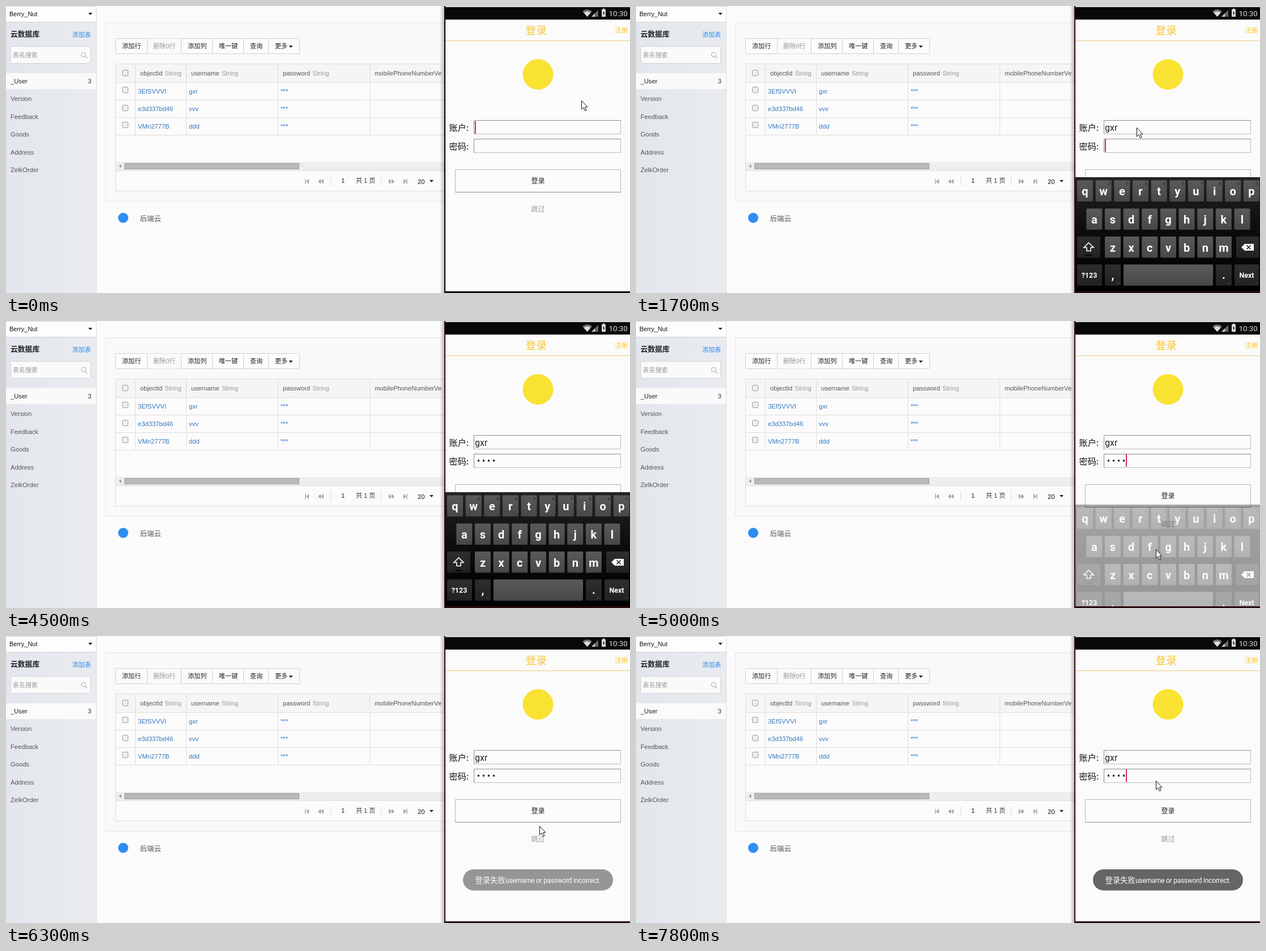
These frames come from a looping animation (1102 px wide and 508 px high, 8000 ms). An HTML page:

```html
<!DOCTYPE html>
<html lang="zh-CN">
<head>
<meta charset="utf-8">
<style>
html, body { margin: 0; width: 100%; height: 100%; overflow: hidden; background: #fbfbfb; }
svg { display: block; width: 100vw; height: 100vh; }
text { font-family: "Liberation Sans", "Noto Sans CJK SC", "Noto Sans CJK", sans-serif; white-space: pre; }
.phone { font-family: Roboto, "Noto Sans CJK SC", "Noto Sans CJK", sans-serif; }
.mono { font-family: "Noto Sans Mono", monospace; }
</style>
</head>
<body>
<svg id="stage" viewBox="0 0 1102 508">
  <defs>
    <linearGradient id="side" x2="1" y2="0"><stop stop-color="#e3e7ed"/><stop offset="1" stop-color="#e9ebef"/></linearGradient>
    <linearGradient id="shade" x2="1" y2="0"><stop stop-color="#000" stop-opacity="0"/><stop offset="1" stop-color="#000" stop-opacity=".25"/></linearGradient>
    <linearGradient id="board" x2="0" y2="1"><stop stop-color="#242424"/><stop offset=".45" stop-color="#0c0c0c"/><stop offset="1" stop-color="#000"/></linearGradient>
    <linearGradient id="key" x2="0" y2="1"><stop stop-color="#5a5a5a"/><stop offset="1" stop-color="#474747"/></linearGradient>
    <linearGradient id="fnKey" x2="0" y2="1"><stop stop-color="#2e2e2e"/><stop offset="1" stop-color="#222"/></linearGradient>
    <clipPath id="cell"><rect x="642" y="103" width="127" height="32"/></clipPath>
    <clipPath id="screen"><rect x="776" y="24" width="326" height="481"/></clipPath>
  </defs>
</svg>
<script>
const LOOP = 8000, STEP = 100;
const USER = 'gxr', PASS = '1234';
const USER_TIMES = [800, 1000, 1300], PASS_TIMES = [2400, 2500, 2800, 3000];
const CARET_RESETS = [0, 800, 1000, 1300, 1700, 2400, 2800];
const FOCUS_PASS = 1700, MASK_LAST = 4400;
// Pointer path: time, x, y
const POINTER = [
  [0, 1016, 167], [600, 884, 215], [2900, 884, 215], [3300, 963, 286], [3400, 963, 286],
  [3700, 1055, 345], [4000, 1018, 420], [4300, 893, 484], [4400, 884, 498], [4500, 876, 512],
  [4600, 878, 512], [4700, 884, 492], [5000, 918, 404], [5500, 946, 313], [5600, 946, 314],
  [6000, 946, 314], [6300, 942, 336], [6900, 1038, 436], [7800, 918, 256], [8000, 918, 256]
];

const stage = document.getElementById('stage');
const clamp = v => Math.max(0, Math.min(1, v));

function add(tag, attrs, parent = stage) {
  const node = document.createElementNS('http://www.w3.org/2000/svg', tag);
  for (const k in attrs) node.setAttribute(k, attrs[k]);
  return parent.appendChild(node);
}
const rect = (x, y, width, height, fill, more, parent) =>
  add('rect', { x, y, width, height, fill, ...more }, parent);
const frame = (x, y, w, h, stroke, fill = 'none', rx = 0) =>
  rect(x + .5, y + .5, w, h, fill, { stroke, rx });
const path = (d, fill, more, parent) => add('path', { d, fill, ...more }, parent);
const line = (d, stroke, more, parent) => path(d, 'none', { stroke, ...more }, parent);
function text(str, x, y, size, fill, more, parent) {
  const node = add('text', { x, y, 'font-size': size, fill, ...more }, parent);
  node.textContent = str;
  return node;
}

function drawSidebar() {
  rect(0, 28, 160, 480, 'url(#side)');
  line('M159.5 0V508', '#d9dce1');
  rect(0, 0, 159, 28, '#fdfdfd');
  line('M0 28.5H160M0 .5H159', '#d0d3d8');
  text('Berry_Nut', 6, 18, 11, '#111');
  path('M145.500 12h7l-3.500 4z', '#111');
  text('云数据库', 8, 54, 12.8, '#222', { 'font-weight': 700 });
  text('添加表', 117, 54.5, 11, '#2b8cf0');
  frame(8, 71, 141, 30, '#cfd3d8', '#fafafa', 1);
  text('表名搜索', 12, 91, 11, '#999');
  add('circle', { cx: 137, cy: 86, r: 3.8, fill: 'none', stroke: '#bbb', 'stroke-width': 1.3 });
  line('M139.800 89l3.500 3.500', '#bbb', { 'stroke-width': 1.6 });
  rect(0, 119, 159, 28, '#fafafa');
  ['_User', 'Version', 'Feedback', 'Goods', 'Address', 'ZelkOrder'].forEach((name, i) =>
    text(name, 8, 137 + i * 31.4, 11.2, i ? '#555' : '#222'));
  text('3', 144.5, 137, 11.2, '#333');
}

function drawTable() {
  frame(175, 29, 620, 316, '#e6e6e6', '#f9f9f9');
  frame(193, 57, 325, 27, '#cfcfcf', '#fcfcfc', 2);
  frame(249, 57, 60, 27, '#e0e0e0', '#fafafa');
  line('M249.500 57V85M309.500 57V85M364.500 57V85M419.500 57V85M463.500 57V85', '#cfcfcf');
  [['添加行', 205], ['删除0行', 260], ['添加列', 321], ['唯一键', 376], ['查询', 431], ['更多', 475]]
    .forEach(([s, x], i) => text(s, x, 74.5, 11.1, i === 1 ? '#999' : '#222'));
  path('M499.500 70h7l-3.500 4z', '#222');

  frame(193, 102, 600, 225, '#dedede', '#fbfbfb');
  rect(194, 103, 590, 32, '#f5f5f5');
  line('M194 135.500H775M194 166.500H775M194 197.500H775M194 228.500H775M228.500 103V228M318.500 103V228M480.500 103V228M642.500 103V228', '#dedede');
  [['objectId', 237], ['username', 327], ['password', 489]].forEach(([s, x]) => {
    const w = text(s, x, 123, 11.2, '#555').getComputedTextLength();
    text('String', x + w + 4.3, 123, 11.2, '#999');
  });
  text('mobilePhoneNumberVerified', 651, 123, 11.2, '#555', { 'clip-path': 'url(#cell)' });
  [['3EfSVVVI', USER], ['e3d337bd46', 'vvv'], ['VMn2777B', 'ddd']].forEach(([id, user], i) => {
    const y = 154.5 + i * 31.2;
    [[id, 233], [user, 323], ['***', 485]].forEach(([s, x]) => text(s, x, y, 11.2, '#3577bd'));
  });
  [113, 143, 175, 205].forEach(y => frame(205, y, 10, 10, '#999', '#eee', 2));

  rect(194, 276, 582, 15, '#eeeeee');
  path('M203.500 280v7l-4-3.500z', '#999');
  frame(209, 278, 308, 10, '#a2a2a2', '#b9b9b9');
  line('M194 291.500H775', '#dedede');
  const grey = '#aaa';
  rect(528, 306, 1.5, 9, grey);
  path('M535 306v9l-5-4.500zM556 306v9l-5-4.500zM561 306v9l-5-4.500zM676 306v9l5-4.500zM681 306v9l5-4.500zM702 306v9l5-4.500z', grey);
  rect(707, 306, 1.5, 9, grey);
  line('M573.500 301V318M662.500 301V318', '#ddd');
  text('1', 592, 313, 11.2, '#222');
  text('共 1 页', 618, 313, 11, '#333');
  text('20', 727, 314.5, 11.2, '#111');
  path('M748 308h7l-3.500 4z', '#222');

  add('circle', { cx: 207, cy: 375, r: 9, fill: '#2f8df2' });
  text('后端云', 236.5, 380.5, 12.5, '#555');
}

function drawPhone() {
  rect(766, 0, 8, 508, 'url(#shade)');
  const edge = rect(774, 0, 328, 508, '#000');
  rect(776, 0, 326, 2, '#d8d8d8');
  rect(776, 2, 326, 22, '#080808');
  rect(776, 24, 326, 481, '#fbfbfb');
  path('M1018 9.500Q1026.500 3 1035 9.500L1026.500 19z', '#777');
  path('M1020.500 12Q1026.500 7.500 1032.500 12L1026.500 19z', '#ddd');
  path('M1046 7v12h-12z', '#666');
  path('M1040 13v6h-6z', '#ccc');
  path('M1052 6h2v-1.500h3V6h2v13h-7z', '#ddd');
  path('M1056.500 8l-3 5h2l-1 4 3.300-5h-2z', '#222');
  const ph = { class: 'phone' };
  text('10:30', 1064.5, 17.5, 13.4, '#ddd', ph);
  text('登录', 917.5, 50, 18.7, '#fcc62c', ph);
  text('注册', 1075, 47, 11.7, '#fcc62c', ph);
  line('M776 61.500H1102', '#e6cc78');
  add('circle', { cx: 939.5, cy: 121, r: 27, fill: '#fae232' });
  [['账户:', 221, 202], ['密码:', 253.5, 235]].forEach(([s, y, top]) => {
    text(s, 782.5, y, 15.2, '#111', { class: 'phone', 'font-weight': 500 });
    frame(826, top, 259, 24, '#bdbdbd', '#fcfcfc');
    line(`M826.500 ${top + 25}V${top + .5}H1086`, '#8c8c8c');
  });
  frame(793, 289, 292, 40, '#b5b5b5', '#fcfcfc');
  line('M793 329.500H1086', '#8c8c8c');
  text('登录', 927.5, 314, 12, '#222', ph);
  text('跳过', 927.5, 364, 12, '#999', ph);
  return edge;
}

function drawKeyboard() {
  const clip = add('g', { 'clip-path': 'url(#screen)' });
  const board = add('g', {}, clip);
  const strip = add('g', {}, board);
  rect(776, 269.500, 326, 34, '#222', {}, strip);
  line('M880.500 277V298M998.500 277V298', '#333', {}, strip);
  rect(776, 303, 326, 210, 'url(#board)', {}, board);

  const mid = { class: 'phone', 'text-anchor': 'middle', 'font-weight': 700 };
  const key = (x, y, w, fill) => rect(x, y - 18.5, w, 37.5, `url(#${fill})`, { rx: 1.5 }, board);
  const label = (s, x, y, size = 20, parent = board) => text(s, x, y, size, '#fff', mid, parent);
  [['qwertyuiop', 779, 327], ['asdfghjkl', 795.300, 377], ['zxcvbnm', 828, 426.500]].forEach(([row, x0, y], r) =>
    [...row].forEach((ch, i) => {
      const x = x0 + i * 32.65;
      key(x, y, 28, 'key');
      label(ch, x + 14, y + 8);
      if (!r) text((i + 1) % 10, x + 21.5, y - 10, 8, '#222', { class: 'phone' }, board);
    }));
  key(779, 426.5, 41, 'fnKey');
  key(1060, 426.5, 40, 'fnKey');
  key(779, 476, 44, 'fnKey');
  key(828, 476, 28, 'fnKey');
  key(861, 476, 158, 'key');
  key(1024, 476, 28, 'fnKey');
  key(1057, 476, 43, 'fnKey');
  line('M799.500 419l8.500 8.500h-5v6h-7v-6h-5z', '#fff', { 'stroke-width': 1.6 }, board);
  line('M793 441.500H806', '#000', { 'stroke-width': 2 }, board);
  path('M1069 427l6-6h16v12h-16z', '#fff', {}, board);
  line('M1078.500 423.500l7 7m0-7l-7 7', '#222', { 'stroke-width': 1.7 }, board);
  label('?123', 800.5, 481, 12.5);
  label(',', 842, 483);
  label('.', 1038, 483);
  [848, 1044, 1093].forEach(x => text('...', x, 491, 8, '#bbb', { class: 'phone' }, board));
  const next = label('Next', 1078.5, 481, 12.5);
  const enter = add('g', {}, board);
  line('M1091.500 469V476H1070', '#fff', { 'stroke-width': 2 }, enter);
  path('M1064 476l8-5.500v11z', '#fff', {}, enter);
  return { board, strip, next, enter };
}

function drawToast() {
  const g = add('g', {});
  rect(807, 413, 265, 37.5, '#656565', { rx: 18.7 }, g);
  text('登录失败', 828.5, 437, 13.3, '#fff', { class: 'phone' }, g);
  text('username or password incorrect.', 882, 437, 12, '#fff', { class: 'phone', 'letter-spacing': -.25 }, g);
  return g;
}

drawSidebar();
drawTable();
const edge = drawPhone();
const userText = text('', 828, 221, 16, '#222', { class: 'phone' });
const passText = text('', 830, 253, 15, '#222', { class: 'mono' });
const caret = rect(0, 0, 2, 22, '#d8246a');
const kb = drawKeyboard();
const toast = drawToast();
const pointer = path('M.500 .500V16L4 12.700 6.500 18.500 9 17.400 6.600 11.800H11z', '#fff', { stroke: '#111' });

const show = (node, on) => node.setAttribute('visibility', on ? 'inherit' : 'hidden');
const countPast = (times, t) => times.filter(v => v <= t).length;

function pointerAt(t) {
  const i = POINTER.findIndex(p => p[0] > t);
  const [t0, x0, y0] = POINTER[i - 1], [t1, x1, y1] = POINTER[i];
  const k = (t - t0) / (t1 - t0);
  return [Math.round(x0 + (x1 - x0) * k), Math.round(y0 + (y1 - y0) * k)];
}

function render(t) {
  const onPass = t >= FOCUS_PASS;
  userText.textContent = USER.slice(0, countPast(USER_TIMES, t));
  const n = countPast(PASS_TIMES, t);
  const masked = t >= MASK_LAST ? n : Math.max(0, n - 1);
  passText.textContent = '•'.repeat(masked) + PASS.slice(masked, n);

  const reset = CARET_RESETS[countPast(CARET_RESETS, t) - 1];
  const typed = userText.textContent ? userText.getComputedTextLength() : 0;
  const passCaret = n ? 829 + 9 * n : 828;
  caret.setAttribute('x', onPass ? passCaret : Math.round(828 + typed));
  caret.setAttribute('y', onPass ? 236 : 204);
  show(caret, Math.floor((t - reset) / 500) % 2 === 0);

  const enter = clamp((t - 800) / 200), leave = clamp((t - 4850) / 250);
  show(kb.board, t >= 800 && leave < 1);
  kb.board.setAttribute('transform', `translate(0 ${2.5 * (1 - enter) + Math.round(60 * leave * leave)})`);
  kb.board.setAttribute('opacity', (.87 + .13 * enter) * (1 - leave));
  show(kb.strip, !onPass);
  show(kb.enter, !onPass);
  show(kb.next, onPass);

  toast.setAttribute('opacity', clamp((t - 6100) / 300));
  edge.setAttribute('fill', t < 100 ? '#000' : '#2a0a0c');
  pointer.setAttribute('transform', `translate(${pointerAt(t)})`);
}

function tick() {
  const t = performance.now() % LOOP;
  render(Math.floor(t / STEP) * STEP);
  requestAnimationFrame(tick);
}
tick();
</script>
</body>
</html>
```
